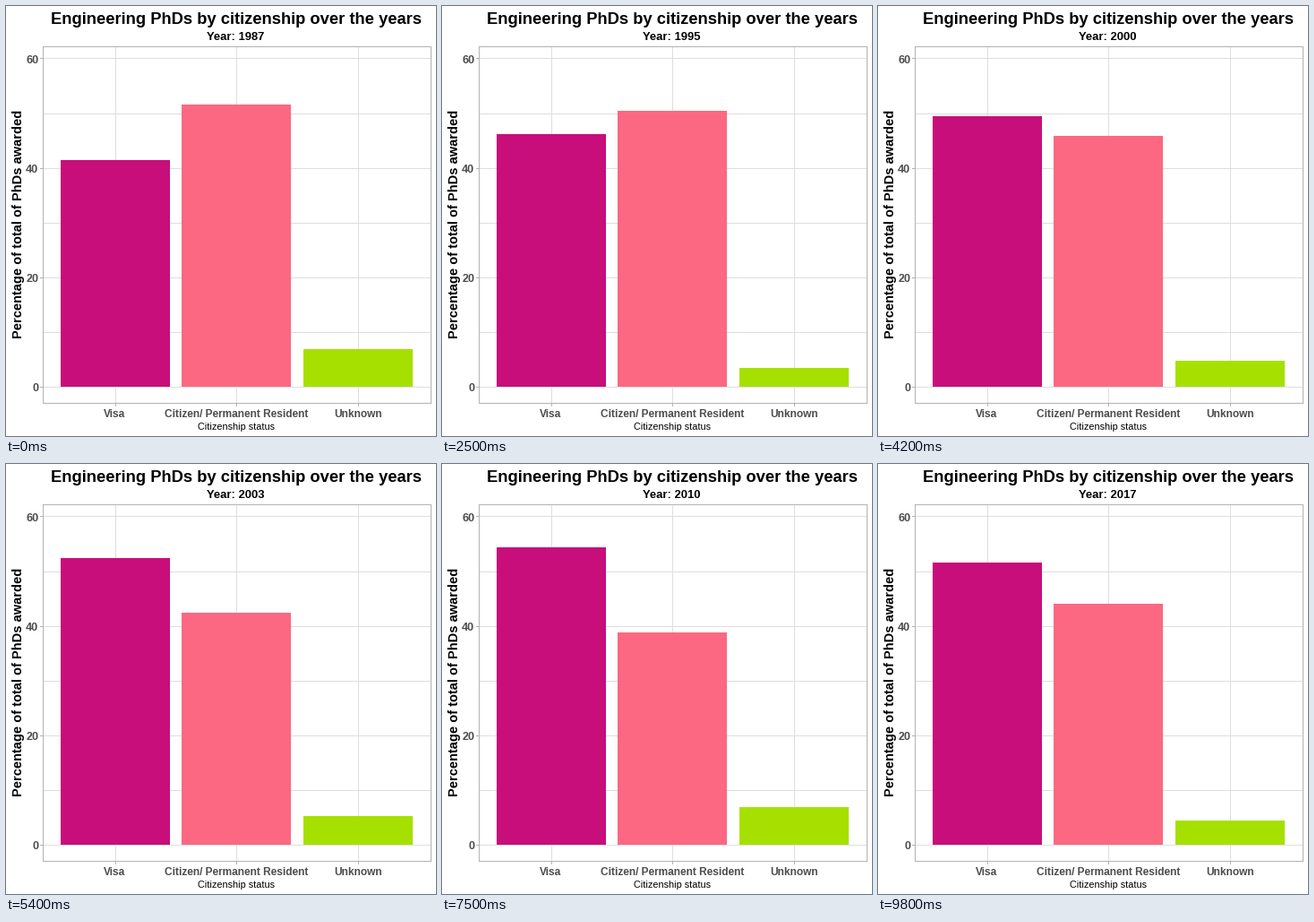
Recreate the animation shown at these times as a matplotlib script. Size 480 by 480 pixels, loop 10 s.

```python
import matplotlib.pyplot as plt
from matplotlib.animation import FuncAnimation
from matplotlib.patches import Rectangle

SIZE, DPI = 480, 100
FRAMES, INTERVAL = 100, 100

GRID, BORDER, LABEL = "#DEDEDE", "#B3B3B3", "#4D4D4D"
LEFT, RIGHT, TOP, BOTTOM = 41, 474, 45, 443
BASE = 425      # pixel row of zero percent
UNIT = 6.11     # pixels per percent

# Bar tops (pixel rows) at each survey year, 1987 to 2017 in steps of five
KEYS = [0, 17, 33, 49, 66, 83, 99]
BARS = [
    ("Visa", 61, 122, "#C70E7B", [171.9, 116.4, 169.6, 107, 63.3, 110.6, 110]),
    ("Citizen/ Permanent Resident", 196, 257, "#FC6882",
     [110, 142.1, 92.2, 163.8, 224.5, 167.3, 156.3]),
    ("Unknown", 332, 393, "#A6E000", [383, 406, 403, 394, 377, 387, 398]),
]
BAR_WIDTH = 122

plt.rcParams["font.family"] = "Liberation Sans"
fig = plt.figure(figsize=(SIZE / DPI, SIZE / DPI), dpi=DPI, facecolor="white")
ax = fig.add_axes([0, 0, 1, 1])
ax.set_xlim(0, SIZE)
ax.set_ylim(SIZE, 0)
ax.axis("off")


def box(x0, y0, x1, y1, color, z):
    patch = Rectangle((x0, y0), x1 - x0, y1 - y0, fc=color, lw=0, zorder=z)
    return ax.add_patch(patch)


def label(x, y, text, px, color="black", weight="bold", ha="center", **kw):
    kw.setdefault("va", "baseline")
    return ax.text(x, y, text, fontsize=px * 72 / DPI, color=color,
                   weight=weight, ha=ha, zorder=5, **kw)


def ease(t):
    """Quintic in-out."""
    return 16 * t ** 5 if t < 0.5 else 1 - 16 * (1 - t) ** 5


def bar_top(tops, frame):
    k = max(i for i in range(len(KEYS) - 1) if KEYS[i] <= frame)
    t = (frame - KEYS[k]) / (KEYS[k + 1] - KEYS[k])
    return round(tops[k] + (tops[k + 1] - tops[k]) * ease(t))


# Horizontal grid, ticks and labels
for pct in range(0, 61, 10):
    row = round(BASE - pct * UNIT)
    box(LEFT, row, RIGHT, row + 1, GRID, 1)
    if pct % 20 == 0:
        box(LEFT - 3, row, LEFT, row + 1, BORDER, 3)
        label(36.3, row + 5.5, str(pct), 12.6, LABEL, ha="right")

# Vertical grid, ticks, labels and bars
rects = []
for name, x, mid, color, tops in BARS:
    box(mid, TOP, mid + 1, BOTTOM, GRID, 1)
    box(mid, BOTTOM, mid + 1, BOTTOM + 4, BORDER, 3)
    label(mid if name != "Visa" else mid - 0.5, 459, name, 11.9, LABEL)
    rects.append(box(x, tops[0], x + BAR_WIDTH, BASE, color, 2))

# Panel border
box(LEFT, TOP, RIGHT + 1, TOP + 1, BORDER, 3)
box(LEFT, BOTTOM, RIGHT + 1, BOTTOM + 1, BORDER, 3)
box(LEFT, TOP, LEFT + 1, BOTTOM + 1, BORDER, 3)
box(RIGHT, TOP, RIGHT + 1, BOTTOM + 1, BORDER, 3)

label(256.5, 20, "Engineering PhDs by citizenship over the years", 18.4)
year_text = label(256.5, 38, "Year: 1987", 13)
label(256.5, 473, "Citizenship status", 10.9, weight="normal")
label(18, 243.5, "Percentage of total of PhDs awarded", 14.65, ha="right",
      va="center", rotation=90, rotation_mode="default").set(
          ha="center", va="baseline", rotation_mode="anchor")


def update(frame):
    for rect, bar in zip(rects, BARS):
        top = bar_top(bar[4], frame)
        rect.set_y(top)
        rect.set_height(BASE - top)
    year = int(1987 + 30 * frame / (FRAMES - 1) + 0.5)
    year_text.set_text(f"Year: {year}")
    return [*rects, year_text]


anim = FuncAnimation(fig, update, frames=FRAMES, interval=INTERVAL,
                     init_func=lambda: update(0), repeat=True, repeat_delay=0)
plt.show()
```
